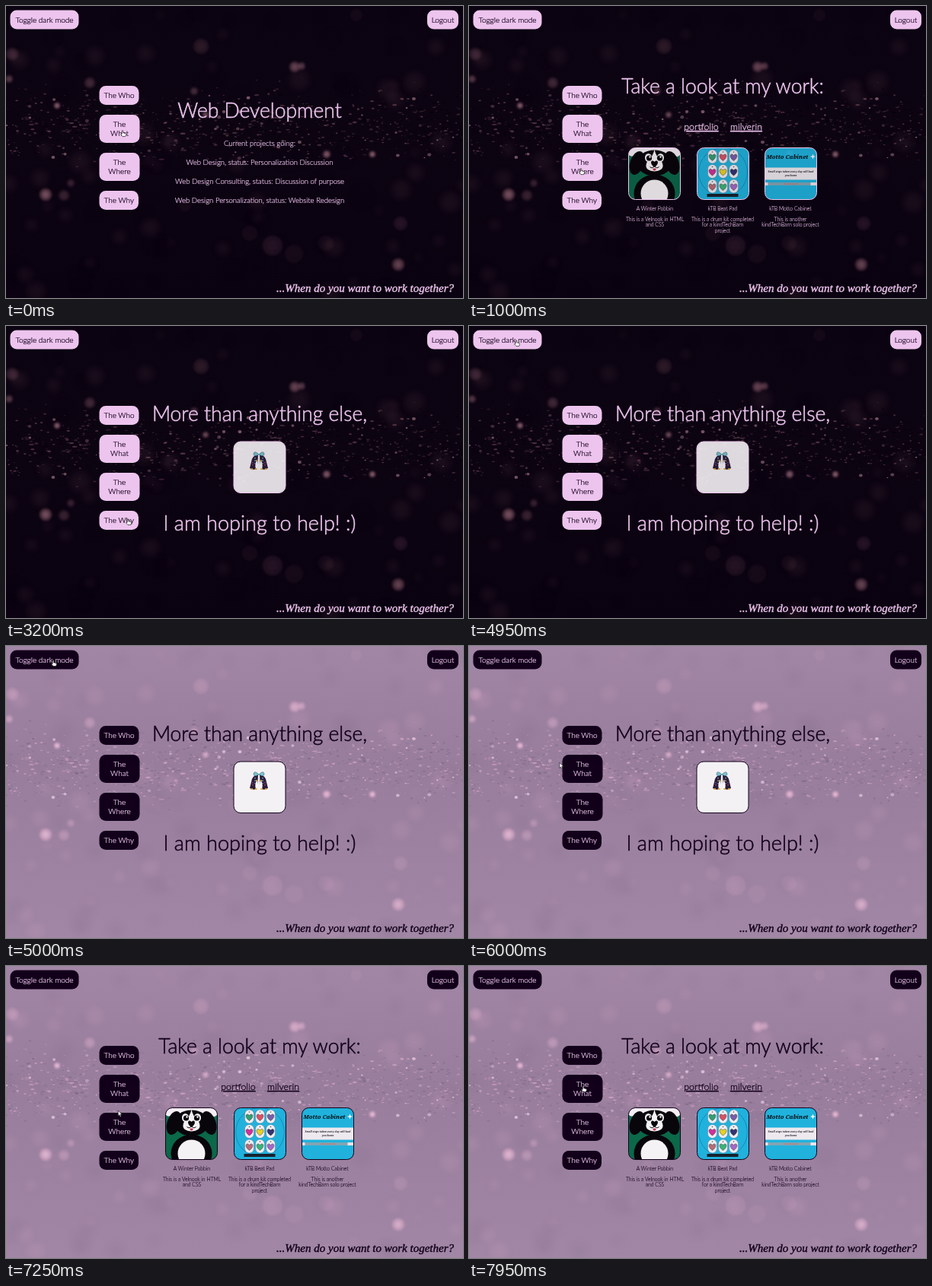
Write an HTML page with a canvas that moves like this. It is 600 px wide and 384 px high and loops after 8000 ms.

```html
<!DOCTYPE html>
<html lang="en">
<head>
<meta charset="utf-8">
<style>
html, body { margin: 0; width: 100%; height: 100%; overflow: hidden; background: #0b0210; }
canvas, svg { position: absolute; left: 0; top: 0; width: 600px; height: 384px; }
svg { --ink: #edc4ee; --paper: #18041f; --shade: .9; font: 300 9.55px Lato, sans-serif; fill: var(--ink); }
svg.light { --ink: #12001a; --paper: #edc9ee; --shade: 1; }
text { text-anchor: middle; stroke: var(--ink); stroke-width: .2px; }
.title { font-size: 26.5px; stroke-width: .55px; }
.link { font-size: 12.4px; stroke-width: .3px; text-decoration: underline; text-decoration-thickness: 1px; }
.note { font-size: 6.8px; }
.note text { stroke-width: .1px; }
.button text { font-size: 10px; fill: var(--paper); stroke: var(--paper); }
.tagline { font: italic 15px "Liberation Serif", serif; stroke-width: .4px; text-anchor: end; }
.art { opacity: var(--shade); }
.art text { stroke: none; }
.frame { fill: none; stroke: var(--ink); }
.page { display: none; }
.page.on { display: block; }
</style>
</head>
<body>
<canvas width="600" height="384"></canvas>
<svg viewBox="0 0 600 384">
  <defs>
    <clipPath id="round"><rect width="68" height="68" rx="9"/></clipPath>
    <path id="heart" d="M0 4.5C-8-1-3.5-7 0-2.5C3.5-7 8-1 0 4.5Z"/>
    <g id="penguin">
      <path d="M32 17Q24 18 23 27L21 35Q25 38 30 36Q32 27 32 17Z" fill="#2b1d38"/>
      <path d="M31 24Q27 29 29 36L32 37Z" fill="#faf8fa"/>
      <path d="M25 27v6" stroke="#a43b72" stroke-width="1.6" stroke-dasharray="1.5 1.5"/>
      <path d="M28 21v8" stroke="#7fbcd4" stroke-width="1.4" stroke-dasharray="1.5 2"/>
      <path d="M22 36h3M28 36h3M29 25h2" stroke="#e5a92f" stroke-width="1.6"/>
    </g>
  </defs>
  <g id="buttons"></g>
  <text class="tagline" x="588" y="376">...When do you want to work together?</text>

  <g id="pages">
    <g class="page">
      <text class="title" x="333" y="147">Web Development</text>
      <text x="333" y="184">Current projects going:</text>
      <text x="333" y="209">Web Design, status: Personalization Discussion</text>
      <text x="333" y="234">Web Design Consulting, status: Discussion of purpose</text>
      <text x="333" y="259">Web Design Personalization, status: Website Redesign</text>
    </g>

    <g class="page">
      <text class="title" x="333" y="115">Take a look at my work:</text>
      <text class="link" x="305" y="163">portfolio</text>
      <text class="link" x="364" y="163">milverin</text>

      <g transform="translate(209.5 186.5)">
        <g class="art" clip-path="url(#round)">
          <rect width="68" height="68" fill="#0b6849"/>
          <path d="M0 0H68V9Q62 15 57 8Q51 14 46 8Q40 13 34 7Q28 13 22 8Q16 14 11 8Q5 14 0 9Z" fill="#f4eef4"/>
          <g fill="#08050b">
            <ellipse cx="34" cy="20" rx="23" ry="17"/>
            <ellipse cx="11" cy="20" rx="9" ry="16" transform="rotate(18 11 20)"/>
            <ellipse cx="57" cy="20" rx="9" ry="16" transform="rotate(-18 57 20)"/>
            <ellipse cx="34" cy="60" rx="27" ry="25"/>
          </g>
          <g fill="#f5f2f5">
            <circle cx="34" cy="60" r="18"/>
            <path d="M34 2Q36 12 43 17Q50 30 34 31Q18 30 25 17Q32 12 34 2Z"/>
            <ellipse cx="26" cy="13" rx="4.5" ry="5.5"/><ellipse cx="42" cy="13" rx="4.5" ry="5.5"/>
          </g>
          <g fill="#08050b">
            <circle cx="27" cy="13.5" r="3.6"/><circle cx="41" cy="13.5" r="3.6"/>
            <path d="M28 25Q31 28 34 24Q37 28 40 25" fill="none" stroke="#08050b"/>
            <use href="#heart" x="34" y="21"/>
          </g>
          <g fill="#fff"><circle cx="28" cy="12" r="1.2"/><circle cx="42" cy="12" r="1.2"/></g>
          <path d="M32 27h4v2q-2 2-4 0z" fill="#c23a58"/>
        </g>
        <rect class="frame" width="68" height="68" rx="9"/>
      </g>

      <g transform="translate(299.5 186.5)">
        <g class="art" clip-path="url(#round)">
          <rect width="68" height="68" fill="#20b2dc"/>
          <circle cx="34" cy="32" r="32" fill="none" stroke="#1678ad" stroke-width=".7"/>
          <g id="pads"></g>
          <rect x="13" y="60.5" width="41" height="4" fill="#18222d"/>
        </g>
        <rect class="frame" width="68" height="68" rx="9"/>
      </g>

      <g transform="translate(388.5 186.5)">
        <g class="art" clip-path="url(#round)">
          <rect width="68" height="68" fill="#20b2dc"/>
          <text x="29.5" y="14.5" fill="#09090d" style="font:italic bold 7.6px 'Noto Serif',serif">Motto Cabinet</text>
          <path d="M63 8l1 2.5 2.5 1-2.5 1-1 2.5-1-2.5-2.5-1 2.5-1z" fill="#e9f5fa"/>
          <rect y="26" width="68" height="16" fill="#eee9ee"/>
          <g fill="#26222b" style="font:italic bold 3.2px 'Noto Serif',serif">
            <text x="34" y="32.5">Small steps taken every day will lead</text>
            <text x="34" y="37">you home</text>
          </g>
          <rect y="45.5" width="68" height="4" fill="#82a5b3"/>
          <path d="M0 45.5h4v4h-4zM60 45.5h8v4h-8z" fill="#e9e4e9"/>
          <path d="M24 47.5h20" stroke="#c07676"/>
        </g>
        <rect class="frame" width="68" height="68" rx="9"/>
      </g>

      <g class="note">
        <text x="244" y="269">A Winter Pobbin</text>
        <text x="244" y="283">This is a Velnook in HTML</text>
        <text x="244" y="290">and CSS</text>
        <text x="333" y="269">kTB Beat Pad</text>
        <text x="333" y="283">This is a drum kit completed</text>
        <text x="333" y="290">for a kindTechBarn</text>
        <text x="333" y="298">project</text>
        <text x="422" y="269">kTB Motto Cabinet</text>
        <text x="422" y="283">This is another</text>
        <text x="422" y="290">kindTechBarn solo project</text>
      </g>
    </g>

    <g class="page">
      <text class="title" x="333" y="125">More than anything else,</text>
      <text class="title" x="333" y="269" style="font-size:27.1px">I am hoping to help! :)</text>
      <g transform="translate(299 152)">
        <g class="art">
          <rect width="68" height="67.5" rx="9" fill="#f4f1f5"/>
          <use href="#penguin"/>
          <use href="#penguin" transform="matrix(-1 0 0 1 66 0)"/>
          <path d="M33 17Q27 11 26 16Q26 21 33 17ZM33 17Q39 11 40 16Q40 21 33 17Z" fill="#7fc0cf" stroke="#39707f" stroke-width=".6"/>
        </g>
        <rect class="frame" width="68" height="67.5" rx="9"/>
      </g>
    </g>
  </g>

  <g id="cursor" fill="#fff" stroke="#111" stroke-width=".8" stroke-linejoin="round">
    <path id="hand" d="M-1 0Q0-1 1 0V3.5L5 4.5Q6 5 5.5 7L4.5 9.5H0L-3 6Q-3 4.5-1 5.5Z"/>
    <path id="arrow" d="M0 0V9L2 7.2L3.5 10.5L5 9.8L3.6 6.6H6.4Z"/>
  </g>
</svg>
<script>
const $ = selector => document.querySelector(selector);
const svg = $('svg'), ctx = $('canvas').getContext('2d');

const buttons = [
  [5.5, 5.5, 90, 25, 'Toggle dark mode'],
  [553, 5.5, 41, 25, 'Logout'],
  [122.5, 105, 52, 25, 'The Who'],
  [122.5, 143, 53, 37, 'The', 'What'],
  [122.5, 193, 53, 37, 'The', 'Where'],
  [122.5, 243, 51.5, 25, 'The Why']
];
$('#buttons').innerHTML = buttons.map(([x, y, w, h, ...lines]) =>
  `<g class="button"><rect x="${x}" y="${y}" width="${w}" height="${h}" rx="8.5"/>` +
  lines.map((line, i) => `<text x="${x + w / 2}" y="${y + 16.3 + i * 12}">${line}</text>`).join('') + '</g>'
).join('');

const padColors = ['#319f72', '#db5066', '#785fa8', '#d42f9b', '#e8cf28', '#353370', '#b66c78', '#39b477', '#a769c6'];
$('#pads').innerHTML = padColors.map((color, i) => {
  const x = 20 + i % 3 * 14, y = 11.5 + Math.floor(i / 3) * 19.5;
  return `<rect x="${x - 6}" y="${y - 9}" width="12" height="18" rx="6" fill="#efedf2" stroke="#497d99" stroke-width=".5"/>
    <circle cx="${x}" cy="${y - 6}" r=".8" fill="#555"/><use href="#heart" x="${x}" y="${y + 1}" fill="${color}" stroke="#333" stroke-width=".5"/>`;
}).join('');

// x, y, radius, strength of the larger lights
const lights = [
  [8, 63, 8, .4], [4, 96, 5, .6], [256, 53, 10, .3], [379, 80, 7, .7], [388, 79, 5, .6],
  [110, 101, 7, .45], [67, 131, 4, 1], [247, 112, 5, .5], [262, 143, 4, .8], [421, 195, 5, .9],
  [481, 195, 4, 1], [52, 248, 8, .8], [76, 249, 7, .4], [85, 233, 5, .4], [350, 315, 13, .25],
  [320, 299, 10, .14], [420, 312, 10, .15], [515, 340, 8, .7], [518, 286, 9, .25], [378, 326, 12, .14],
  [235, 262, 8, .12], [460, 12, 8, .12]
];

function paintBackground(light) {
  let seed = 41;
  const random = () => (seed = seed * 16807 % 2147483647) / 2147483647;
  const dot = (x, y, r, color, alpha, stretch = 1) => {
    ctx.globalAlpha = alpha;
    ctx.fillStyle = color;
    ctx.beginPath();
    ctx.ellipse(x, y, r * stretch, r, 0, 0, 7);
    ctx.fill();
  };
  const glow = light ? '#f4b9d9' : '#94606f';
  const spark = light ? '#ffe0f2' : '#b58594';
  const dark = light ? '#75607e' : '#030007';
  const gradient = ctx.createLinearGradient(0, 0, 0, 384);
  (light ? ['#a286a5', '#987d9c', '#a186a5'] : ['#0b0311', '#0d0412', '#0a0210'])
    .forEach((color, i) => gradient.addColorStop([0, .4, 1][i], color));
  ctx.globalAlpha = 1;
  ctx.fillStyle = gradient;
  ctx.fillRect(0, 0, 600, 384);

  ctx.filter = 'blur(4px)';
  for (let i = 0; i < 110; i++)
    dot(random() * 600, random() * 384, 4 + random() * 9, random() < .5 ? glow : dark, .1);
  ctx.filter = 'blur(.6px)';
  for (let i = 0; i < 1100; i++) {
    const y = 157 + (random() + random() + random() - 1.5) * 45;
    dot(random() * 600, y, .4 + random() * .8, random() < .5 ? glow : dark, .15 + random() * .35, 1 + random() * 2);
  }
  for (let i = 0; i < 70; i++)
    dot(random() * 600, 110 + random() * 95, .6 + random() * 1.6, spark, .2 + random() * .5, 1.2);
  ctx.filter = 'blur(1.8px)';
  for (const [x, y, r, strength] of lights) {
    dot(x, y, r, glow, strength * .6);
    dot(x, y, r * .55, spark, strength * strength * .5);
  }
  ctx.filter = 'none';
}

// time, x, y of the pointer tip
const route = [
  [0, 153, 164], [350, 153, 164], [750, 147, 214], [1150, 147, 214], [1600, 160, 254], [3500, 160, 254],
  [4500, 62, 19], [5500, 62, 19], [6300, 145, 215], [6700, 145, 215], [7900, 150, 158], [8000, 150, 158]
];
function pointerAt(t) {
  const i = route.findIndex(stop => stop[0] > t);
  const [t0, x0, y0] = route[i - 1], [t1, x1, y1] = route[i];
  const u = (t - t0) / (t1 - t0), ease = u * u * (3 - 2 * u);
  return [x0 + (x1 - x0) * ease, y0 + (y1 - y0) * ease];
}

const pages = document.querySelectorAll('.page');
let theme;
function draw() {
  const t = performance.now() % 8000;
  const light = t >= 5000;
  const page = t < 900 ? 0 : t < 2300 || t >= 6600 ? 1 : 2;
  if (light !== theme) {
    paintBackground(theme = light);
    svg.classList.toggle('light', light);
  }
  pages.forEach((el, i) => el.classList.toggle('on', i === page));

  const [x, y] = pointerAt(t);
  const hover = buttons.some(([bx, by, w, h]) => x > bx && x < bx + w && y > by && y < by + h);
  $('#cursor').setAttribute('transform', `translate(${x} ${y}) scale(.8)`);
  $('#hand').style.display = hover ? '' : 'none';
  $('#arrow').style.display = hover ? 'none' : '';
  requestAnimationFrame(draw);
}
draw();
</script>
</body>
</html>
```
